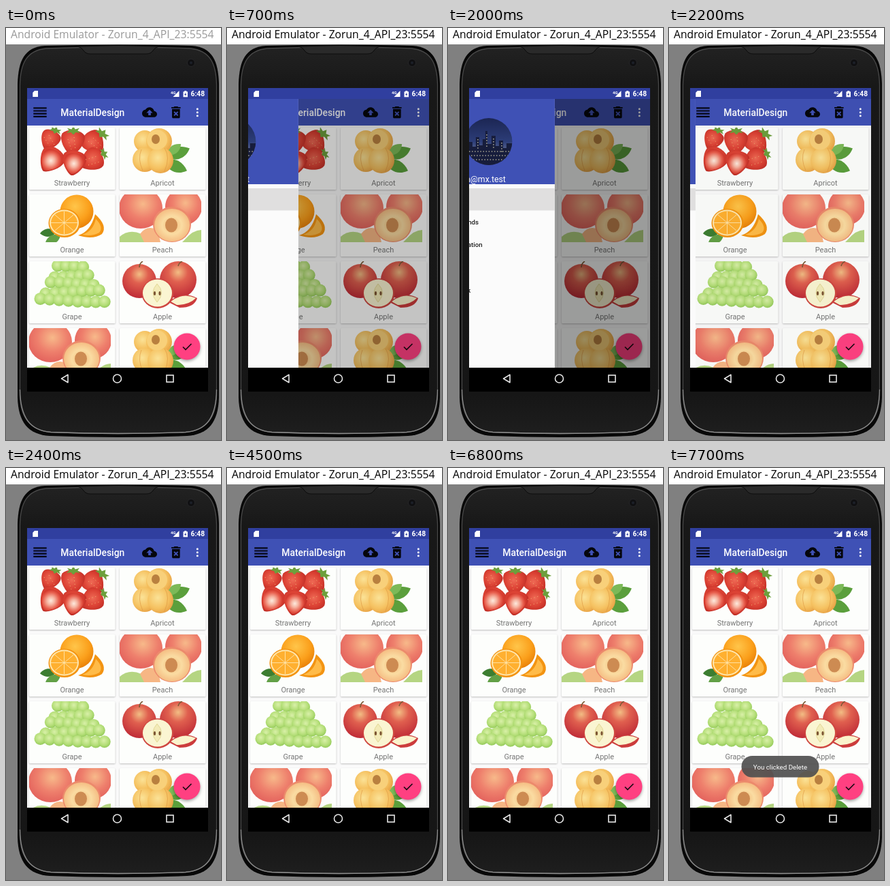
Recreate the animation shown at these times as an HTML page. Size 316 by 604 pixels, loop 8 s.

```html
<!DOCTYPE html>
<html lang="en">
<head>
<meta charset="utf-8">
<title>Fruit cards</title>
<style>
html, body { margin: 0; width: 100%; height: 100%; overflow: hidden; background: #808080; }
svg { display: block; width: 316px; height: 604px; font-family: Roboto, sans-serif; }
.caption { font: 15.7px "Open Sans", "Noto Sans", sans-serif; }
.label { font-size: 11px; fill: #757575; text-anchor: middle; }
.card { fill: #fdfefc; filter: drop-shadow(0 1px 1px rgba(0, 0, 0, .24)); }
.menu { font-size: 9.7px; font-weight: 500; fill: #212121; }
.toast text { font-size: 9.75px; fill: #fff; text-anchor: middle; }
.toast { opacity: 0; }

.caption, .app, .toast { animation: 8s step-end -5ms infinite; }
.caption { animation-name: focus; }
.app { --p: 0; animation-name: slide; }
.backup { animation-name: backup; }
.delete { animation-name: delete; }
.scrim { opacity: calc(var(--p) * .6); }
.drawer { transform: translateX(calc((var(--p) - 1) * 194px)); }

@keyframes focus { 0% { fill: #999; } 6.25%, 100% { fill: #000; } }
@keyframes slide {
  0% { --p: 0; }
  8.75% { --p: .381; }
  10% { --p: .813; }
  11.25% { --p: .962; }
  12.5% { --p: .996; }
  13.75% { --p: 1; }
  25% { --p: .649; }
  26.25% { --p: .197; }
  27.5% { --p: .041; }
  28.75% { --p: .005; }
  30%, 100% { --p: 0; }
}
@keyframes backup {
  0% { opacity: 0; }
  57.5% { opacity: .19; }
  58.75% { opacity: .51; }
  60% { opacity: .75; }
  61.25% { opacity: .91; }
  62.5% { opacity: 1; }
  80% { opacity: .96; }
  81.25% { opacity: .84; }
  82.5% { opacity: .64; }
  83.75% { opacity: .36; }
  85%, 100% { opacity: 0; }
}
@keyframes delete {
  0% { opacity: 0; }
  91.25% { opacity: .19; }
  92.5% { opacity: .51; }
  93.75% { opacity: .75; }
  95% { opacity: .91; }
  96.25%, 100% { opacity: 1; }
}
</style>
</head>
<body>
<svg viewBox="0 0 316 604">
<defs>
  <clipPath id="screen"><rect x="31" y="104" width="266" height="394"/></clipPath>
  <clipPath id="photo"><rect width="120" height="70"/></clipPath>
  <clipPath id="face"><circle cx="128" cy="166.5" r="34.5"/></clipPath>
  <radialGradient id="red" cx=".45" cy=".4" r=".7"><stop stop-color="#ee6a55"/><stop offset=".5" stop-color="#dc4234"/><stop offset="1" stop-color="#b3241f"/></radialGradient>
  <radialGradient id="cut"><stop stop-color="#fdeade"/><stop offset=".35" stop-color="#f6b5a2"/><stop offset=".75" stop-color="#e8604f"/><stop offset="1" stop-color="#d43a2e"/></radialGradient>
  <radialGradient id="apri" cx=".4" cy=".4" r=".7"><stop stop-color="#fbe296"/><stop offset=".6" stop-color="#f5c160"/><stop offset="1" stop-color="#e49a3e"/></radialGradient>
  <radialGradient id="orng" cx=".45" cy=".35" r=".7"><stop stop-color="#ffc54a"/><stop offset=".6" stop-color="#fba01c"/><stop offset="1" stop-color="#e67c04"/></radialGradient>
  <radialGradient id="pch" cx=".55" cy=".4" r=".7"><stop stop-color="#f7b98a"/><stop offset=".5" stop-color="#ee7f6c"/><stop offset="1" stop-color="#e05a58"/></radialGradient>
  <radialGradient id="flesh"><stop stop-color="#f2b978"/><stop offset=".55" stop-color="#fadca2"/><stop offset="1" stop-color="#f5be84"/></radialGradient>
  <radialGradient id="grp" cx=".45" cy=".4" r=".65"><stop stop-color="#d9f0a8"/><stop offset=".6" stop-color="#b4de78"/><stop offset="1" stop-color="#8ec654"/></radialGradient>
  <radialGradient id="apl" cx=".5" cy=".3" r=".75"><stop stop-color="#f2bd84"/><stop offset=".35" stop-color="#e0604f"/><stop offset="1" stop-color="#bb2433"/></radialGradient>
  <linearGradient id="night" x2="0" y2="1"><stop stop-color="#1b2552"/><stop offset=".5" stop-color="#2c3d78"/><stop offset=".75" stop-color="#6a7394"/><stop offset="1" stop-color="#24294a"/></linearGradient>
  <linearGradient id="body" x2="0" y2="1"><stop stop-color="#222"/><stop offset=".1" stop-color="#181818"/><stop offset=".9" stop-color="#161616"/><stop offset="1" stop-color="#1e1e1e"/></linearGradient>
  <path id="berry" d="M-14-9C-8-16 8-16 14-9C19 0 6 17 0 18C-6 17-19 0-14-9Z"/>
  <path id="leaf" d="M0 0C6-11 18-12 28-5C21 6 9 7 0 0Z"/>
  <path id="crown" d="M-11 1L-7-3L-10-7L-3-5L0-10L3-5L10-7L7-3L11 1L4 0L0 4L-4 0Z" fill="#6d9f3c"/>

  <g id="Strawberry" fill="url(#red)">
    <use href="#berry" transform="translate(31 17) rotate(25) scale(.95)"/>
    <use href="#berry" transform="translate(94 21) rotate(-40) scale(1.1)"/>
    <use href="#berry" transform="translate(93 47) rotate(60) scale(1.1)"/>
    <use href="#berry" transform="translate(64 20) rotate(5) scale(1.15)"/>
    <use href="#berry" transform="translate(33 46) rotate(35) scale(1.2)"/>
    <use href="#berry" transform="translate(33 47) rotate(35) scale(1.02)" fill="url(#cut)"/>
    <use href="#berry" transform="translate(66 50) rotate(10) scale(1.15)"/>
    <use href="#berry" transform="translate(66 51) rotate(10) scale(.96)" fill="url(#cut)"/>
    <use href="#crown" transform="translate(38 6) rotate(20) scale(.8)"/>
    <use href="#crown" transform="translate(65 7) scale(.9)"/>
    <use href="#crown" transform="translate(106 11) rotate(40)"/>
    <use href="#crown" transform="translate(108 39) rotate(65) scale(.8)"/>
    <path d="M22 14L30 27M29 11L37 25M57 17L62 32M66 14L68 32M87 20L103 32M94 15L106 27M83 47L99 42M87 55L104 50" stroke="#f3bd78" stroke-dasharray="1 4"/>
  </g>

  <g id="Apricot">
    <g fill="#5b9f3c"><use href="#leaf" transform="translate(70 44) rotate(-12) scale(1.25)"/><use href="#leaf" transform="translate(66 50) rotate(32) scale(1.25)"/><use href="#leaf" transform="translate(70 40) rotate(-28) scale(.9)" fill="#7cb958"/></g>
    <g fill="url(#apri)">
      <circle cx="37" cy="20" r="16"/><circle cx="58" cy="20" r="19"/>
      <circle cx="37" cy="47" r="18"/><circle cx="60" cy="48" r="19"/>
    </g>
    <ellipse cx="55" cy="18" rx="15" ry="14.5" fill="#f8d07a"/>
    <ellipse cx="53" cy="17" rx="6" ry="7" fill="#b9803f"/>
    <path d="M66 30Q75 43 66 64M32 32Q26 46 34 63" fill="none" stroke="#dc9440" stroke-opacity=".6"/>
  </g>

  <g id="Orange">
    <g fill="#3c7d31"><use href="#leaf" transform="translate(40 55) rotate(185) scale(.85)"/><use href="#leaf" transform="translate(46 60) rotate(162) scale(.9)" fill="#62a046"/></g>
    <circle cx="70" cy="25" r="24.5" fill="url(#orng)"/>
    <path d="M72 60Q90 55 97 29Q116 46 107 58Q94 67 72 60Z" fill="#f39412"/>
    <path d="M78 59Q94 54 98 36Q110 48 103 56Q92 62 78 59Z" fill="#ffbb48"/>
    <ellipse cx="52" cy="42" rx="23.5" ry="21" fill="#f39412"/><ellipse cx="51.5" cy="41.5" rx="21.5" ry="19" fill="#ffe7ae"/><ellipse cx="51.5" cy="41.5" rx="19.5" ry="17" fill="#ffb030"/>
    <path d="M51.5 25V58M32 41.5H71M38 30L65 53M65 30L38 53" stroke="#ffe0a0"/>
  </g>

  <g id="Peach">
    <circle cx="94" cy="18" r="27" fill="url(#pch)"/>
    <ellipse cx="31" cy="20" rx="32" ry="30" fill="url(#pch)"/>
    <path d="M0 62Q14 50 32 58Q38 63 40 70H0Z" fill="#b5d582"/>
    <path d="M96 66Q108 52 120 52V70H92Z" fill="#b5d582"/>
    <path d="M30 58Q40 44 56 52L60 70H36Z" fill="#f6b684"/>
    <ellipse cx="77" cy="44" rx="28" ry="26" fill="#ec8a6c"/><ellipse cx="77" cy="45" rx="26" ry="24" fill="url(#flesh)"/>
    <ellipse cx="76" cy="45" rx="9" ry="10.5" fill="#cd8b52"/>
  </g>

  <g id="Grape" fill="url(#grp)"></g>

  <g id="Apple">
    <circle cx="29" cy="29" r="25" fill="url(#apl)"/><circle cx="86" cy="27" r="27" fill="url(#apl)"/>
    <path d="M29 9Q29 3 34 0M86 7Q87 2 92 0" fill="none" stroke="#7a5a36" stroke-width="1.6"/>
    <path d="M72 60Q92 42 114 54Q110 68 88 68Z" fill="#cc3c3c"/><path d="M75 59Q93 45 112 54Q102 64 84 64Z" fill="#faf3cc"/>
    <ellipse cx="56" cy="47" rx="23.5" ry="22" fill="#cf4640"/>
    <ellipse cx="55.5" cy="46.5" rx="21.5" ry="20" fill="#faf5d2"/>
    <path d="M55 33Q43 46 55 60Q68 46 55 33Z" fill="#f3ebb8" stroke="#e2d898"/><ellipse cx="51.5" cy="47" rx="1.6" ry="3" fill="#7b5432"/><ellipse cx="59" cy="47" rx="1.6" ry="3" fill="#7b5432"/>
  </g>
</defs>

<rect width="316" height="24" fill="#fff"/>
<text class="caption" x="7" y="14.5">Android Emulator - Zorun_4_API_23:5554</text>
<rect y="24" width="316" height="580" fill="#808080"/>

<path d="M17 82C18 48 27 28 57 26Q165 23 273 26C303 28 312 48 313 82V542C312 577 298 596 266 598Q165 602 64 598C32 596 18 577 17 542Z" fill="#080808"/>
<path d="M20.500 84C21 52 30 33 59 30Q165 26 271 30C300 33 309 52 309.500 84V538C309 572 294 590 264 592.500Q165 596.500 66 592.500C36 590 21 572 20.500 538Z" fill="url(#body)" stroke="#484848" stroke-width="1.3"/>
<path d="M20.500 530C21 572 36 590 66 592.500Q165 596.500 264 592.500C294 590 309 572 309.500 530" fill="none" stroke="#8c8c8c" stroke-width="1.3"/>
<path d="M105 27Q111 28 114 33Q117 38 124 38H206Q213 38 216 33Q219 28 225 27Q165 24 105 27Z" fill="#2a2a2a" stroke="#0c0c0c"/>
<circle cx="272" cy="51" r="5.500" fill="#101012" stroke="#262628"/><circle cx="272" cy="51" r="2" fill="#1c2029"/>

<rect x="31" y="88" width="266" height="16" fill="#303f9f"/>
<g fill="#fff">
  <path d="M42 92H47V101H39.3V94.7Z"/>
  <text x="242" y="97" font-size="6" font-weight="700">4G</text>
  <path d="M254.5 92V101H245.5Z"/>
  <path d="M262.3 92H265.2V93.2H267V101.3H260.5V93.2H262.3Z"/>
  <text x="271.5" y="100.3" font-size="10.3" font-weight="700">6:48</text>
</g>
<path d="M264.6 94.5L262 98H263.6L263 100L265.6 96.7H264Z" fill="#303f9f"/>

<g class="app" clip-path="url(#screen)">
  <rect x="31" y="143" width="266" height="355" fill="#fafafa"/>
  <g id="cards"></g>
  <rect x="31" y="104" width="266" height="39" fill="#3f51b5"/>
  <path d="M40.3 117.300H59.700M40.3 121.500H59.700M40.3 125.700H59.700M40.3 129.900H59.700" stroke="#060818" stroke-width="2.2"/>
  <text x="80.3" y="129" font-size="13.86" font-weight="500" fill="#fff">MaterialDesign</text>
  <g fill="#05060c">
    <path transform="translate(200 112.5) scale(.917)" d="M19.35 10.04C18.67 6.59 15.64 4 12 4 9.11 4 6.6 5.64 5.35 8.04 2.34 8.36 0 10.91 0 14c0 3.31 2.69 6 6 6h13c2.76 0 5-2.24 5-5 0-2.64-2.05-4.78-4.65-4.96zM14 13v4h-4v-4H7l5-5 5 5h-3z"/>
    <path transform="translate(238.2 112) scale(.97)" d="M6 19c0 1.1.9 2 2 2h8c1.1 0 2-.9 2-2V7H6v12zm2.46-7.12l1.41-1.41L12 12.59l2.12-2.12 1.41 1.41L13.41 14l2.12 2.12-1.41 1.41L12 15.41l-2.12 2.12-1.41-1.41L10.59 14l-2.13-2.12zM15.5 4l-1-1h-5l-1 1H5v2h14V4z"/>
  </g>
  <g fill="#fff"><circle cx="281.3" cy="118.8" r="1.5"/><circle cx="281.3" cy="123.8" r="1.5"/><circle cx="281.3" cy="128.8" r="1.5"/></g>

  <circle cx="266" cy="467" r="19.5" fill="#ff4081" style="filter:drop-shadow(0 2px 2px rgba(0,0,0,.35))"/>
  <path d="M260 467.5L264 471.5L272.5 463" fill="none" stroke="#1c0a12" stroke-width="1.7"/>

  <rect class="scrim" x="31" y="104" width="266" height="394"/>

  <g class="drawer">
    <rect x="31" y="104" width="194" height="394" fill="#fbfbfb"/>
    <rect x="31" y="104" width="194" height="125" fill="#3f51b5"/>
    <g clip-path="url(#face)">
      <rect x="93" y="131" width="70" height="71" fill="url(#night)"/>
      <path d="M93 178H99V167H104V174H109V160H114V172H119V163H123V151H126V170H132V158H138V173H143V165H149V176H154V169H163V202H93Z" fill="#171d3c"/>
      <path d="M95 181H162M98 187H160M101 193H155M112 163V177M125 156V176M135 162V178M147 168V182" stroke="#d9d3b0" stroke-width="1.6" stroke-dasharray="1.5 2.6" opacity=".75"/>
    </g>
    <text x="153" y="225.5" font-size="12.3" fill="#fff" text-anchor="end">fruit.fan@mx.test</text>
    <rect x="31" y="235" width="194" height="32.5" fill="#e0dfdf"/>
    <g fill="#757575">
      <path transform="translate(42 243) scale(.69)" d="M6.62 10.79a15 15 0 0 0 6.59 6.59l2.2-2.2a1 1 0 0 1 1-.24 11 11 0 0 0 3.59.57 1 1 0 0 1 1 1V20a1 1 0 0 1-1 1A17 17 0 0 1 3 4a1 1 0 0 1 1-1h3.5a1 1 0 0 1 1 1 11 11 0 0 0 .57 3.57 1 1 0 0 1-.25 1z"/>
      <circle cx="47" cy="281.5" r="2.6"/><circle cx="53.5" cy="281.5" r="2.6"/><path d="M42.5 290.5Q42.5 286 47 286H53.5Q58 286 58 290.5Z"/>
      <path d="M50.3 311A5 5 0 0 1 55.3 316Q55 320 50.3 325.5Q45.5 320 45.3 316A5 5 0 0 1 50.3 311Z"/>
      <rect x="43.5" y="346" width="13.6" height="11" rx="1.2"/>
      <rect x="44.5" y="378.5" width="11.6" height="12.5" rx="1.2"/>
    </g>
    <circle cx="50.3" cy="316" r="1.8" fill="#fbfbfb"/>
    <path d="M44.5 347.8L50.3 351.8L56 347.8M47 382.5H53.6M47 385H53.6M47 387.5H51.5" fill="none" stroke="#fbfbfb" stroke-width="1.2"/>
    <g class="menu" id="menu"></g>
  </g>
</g>

<rect x="31" y="498" width="266" height="35" fill="#000"/>
<g fill="none" stroke="#e6e6e6" stroke-width="1.6">
  <path d="M81.5 514L91 508.3V519.7Z" stroke-linejoin="round"/><circle cx="163.5" cy="514" r="6"/><rect x="236" y="509" width="10" height="10"/>
</g>

<g class="toast backup"><rect x="103" y="422" width="121" height="31.5" rx="15.7" fill="#505050" fill-opacity=".92"/><text x="163.5" y="442">YOU clicked Backup</text></g>
<g class="toast delete"><rect x="106.5" y="422" width="114" height="31.5" rx="15.7" fill="#505050" fill-opacity=".92"/><text x="163.5" y="442">You clicked Delete</text></g>
</svg>
<script>
const byId = id => document.getElementById(id);

// A bunch that widens towards the bottom.
let grapes = '';
for (let row = 0; row < 5; row++) {
  const y = 9 + row * 12, half = 22 + row * 6;
  for (let dx = -half; dx <= half; dx += 13) {
    const x = 64 + dx + Math.sin(row * 5 + dx) * 2;
    grapes += `<circle cx="${x}" cy="${y + Math.cos(row * 3 + dx) * 2.5}" r="9"/>`;
  }
}
byId('Grape').innerHTML = grapes;

const fruits = ['Strawberry', 'Apricot', 'Orange', 'Peach', 'Grape', 'Apple', 'Peach', 'Apricot'];
byId('cards').innerHTML = fruits.map((name, i) => {
  const x = 34 + (i % 2) * 133, y = 146 + (i >> 1) * 98;
  return `<g transform="translate(${x} ${y})"><rect class="card" width="126.5" height="91" rx="1.5"/>
    <g clip-path="url(#photo)"><use href="#${name}"/></g>
    <text class="label" x="63" y="85">${name}</text></g>`;
}).join('');

byId('menu').innerHTML = ['Call', 'Friends', 'Location', 'Mail', 'Task']
  .map((name, i) => `<text x="81" y="${254.7 + i * 33.2}">${name}</text>`).join('');
</script>
</body>
</html>
```
